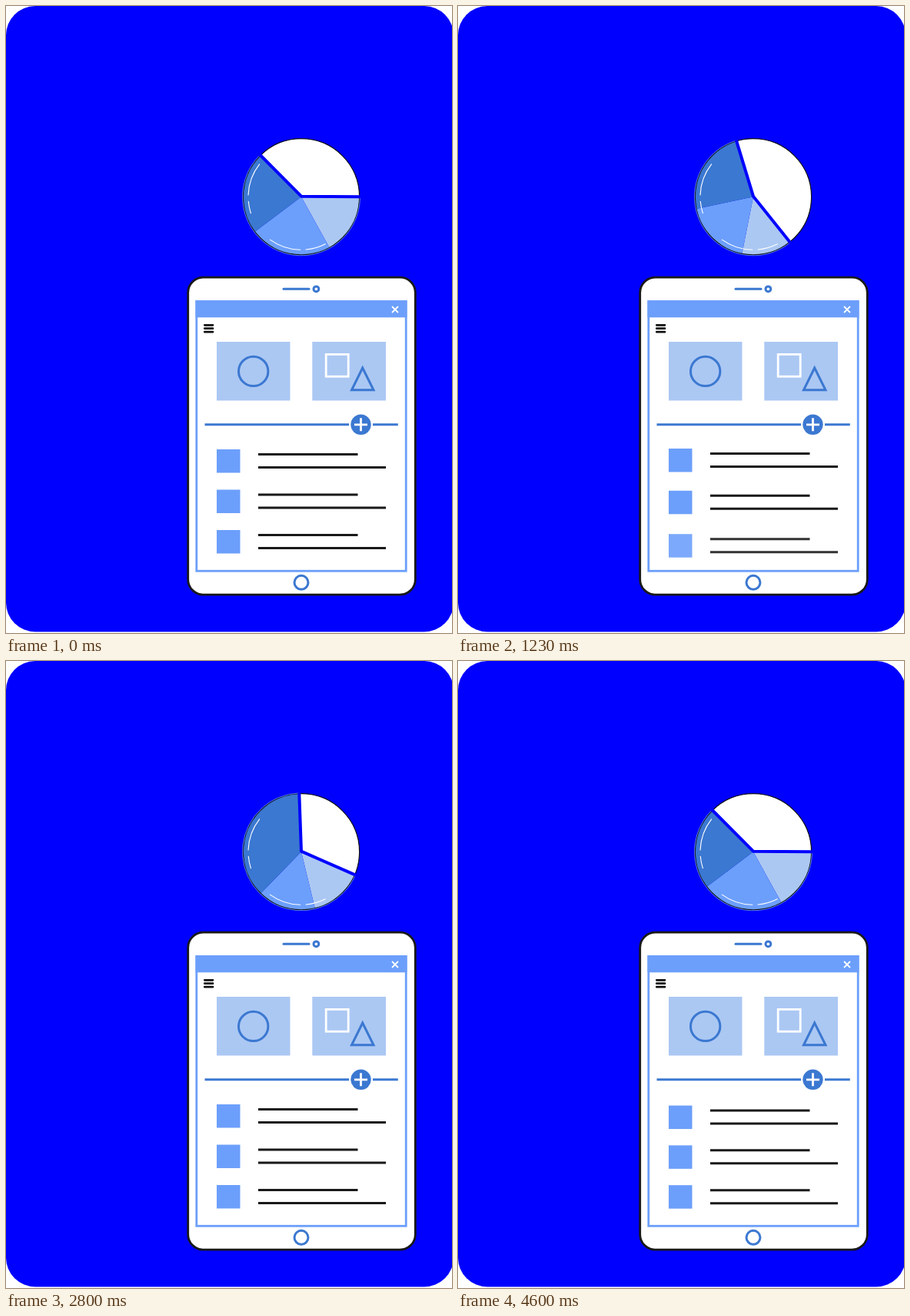
Recreate the animation shown at these times as an HTML page. Size 580 px wide and 816 px high, loop 4.63 s.

```html
<!DOCTYPE html>
<html lang="en">
<head>
<meta charset="utf-8">
<title>Tablet and pie chart</title>
<style>
  html, body { margin: 0; width: 100%; height: 100%; overflow: hidden; background: #fff; }
  svg { display: block; width: 580px; height: 816px; }
  .dark { fill: #3b78d1; }
  .mid { fill: #6c9ffb; }
  .light { fill: #abc8f3; }
  .white { fill: #fff; }
  .line { fill: none; stroke: #3b78d1; stroke-width: 3; }
  .cap { stroke-linecap: round; }
  .ink { fill: none; stroke: #191919; stroke-width: 3; }
  .thin { fill: none; stroke: #fff; stroke-width: 1.1; stroke-linecap: round; }
  .gap { fill: none; stroke: #00f; stroke-width: 4; stroke-linejoin: round; }
</style>
</head>
<body>
<svg viewBox="0 0 580 816">
  <defs>
    <clipPath id="list"><rect x="250" y="547" width="268" height="184.3"/></clipPath>
    <clipPath id="disc"><circle cx="384" cy="248.3" r="77"/></clipPath>
    <g id="row">
      <rect class="mid" x="274" y="577" width="30.5" height="30.5"/>
      <path class="ink" d="M328 583.5H457.5M328 600.5H494"/>
    </g>
  </defs>

  <rect width="582" height="814.5" rx="38" fill="#00f"/>

  <g id="pie">
    <path id="sliceLight" class="light"/>
    <path id="sliceMid" class="mid"/>
    <path id="sliceDark" class="dark"/>
    <path id="sliceWhite" class="white"/>
    <circle cx="384" cy="248.3" r="75.6" fill="none" stroke="#111" stroke-width="1.2"/>
    <path id="rim" fill="none" stroke="#6c9ffb" stroke-width=".8"/>
    <path id="shine" class="thin"/>
    <path id="gap" class="gap" clip-path="url(#disc)"/>
  </g>

  <rect x="236.7" y="353.2" width="295.6" height="413" rx="20" fill="#fff" stroke="#191919" stroke-width="2.8"/>
  <path class="line cap" d="M361 368.3H394"/>
  <circle class="line" cx="403.4" cy="368.3" r="3.4"/>
  <circle class="line" cx="384" cy="750.3" r="9"/>

  <rect x="247.8" y="384.5" width="272.4" height="350.8" fill="none" stroke="#6c9ffb" stroke-width="2.8"/>
  <rect class="mid" x="246.5" y="383" width="275" height="22.3"/>
  <path d="M502 391l8 8m0-8l-8 8" stroke="#fff" stroke-width="1.8"/>
  <path class="cap" d="M258.3 415.3H269M258.3 419.7H269M258.3 424.2H269" stroke="#111" stroke-width="2.7"/>

  <rect class="light" x="274" y="437" width="95.5" height="76.5"/>
  <rect class="light" x="398.3" y="437" width="95.7" height="76.5"/>
  <circle class="line" cx="321.7" cy="475.4" r="19.2"/>
  <rect x="416.2" y="453.4" width="29" height="28.8" fill="none" stroke="#fff" stroke-width="2.8"/>
  <path class="line" d="M463.7 471L449.5 499.8H478Z"/>

  <path class="line" d="M258.5 544.8H509.8"/>
  <circle class="white" cx="461.5" cy="544.8" r="15.5"/>
  <circle class="dark" cx="461.5" cy="544.8" r="13.2"/>
  <path d="M453 544.8H470M461.5 536.3V553.3" stroke="#fff" stroke-width="2.8"/>

  <g id="rows" clip-path="url(#list)">
    <use href="#row"/><use href="#row"/><use href="#row"/><use href="#row"/>
  </g>
</svg>

<script>
const LOOP = 4630;
const $ = id => document.getElementById(id);
const clamp = v => Math.min(1, Math.max(0, v));
const setPath = (id, d) => $(id).setAttribute('d', d);

// Pie: slice edges in degrees, clockwise from three o'clock, as [time, angle]
const CX = 384, CY = 248.3, R = 75.6;
const edges = {
  right: [[70, 0], [830, 42], [1770, 57], [2370, 24], [3330, 22.5], [3800, .5], [3900, 0]],
  light: [[70, 61], [830, 98], [1770, 103], [2370, 73], [3330, 81], [3800, 61]],
  mid: [[70, 143], [830, 175], [1770, 152], [2370, 141], [3330, 125], [3800, 110], [4600, 143]],
  left: [[70, 225.5], [500, 257], [700, 261], [830, 259], [1130, 255], [1650, 243], [1770, 236],
         [2070, 229], [2370, 236], [2790, 268], [3330, 245], [3800, 225.5]]
};

// Monotone cubic interpolation through the keys
function track(keys, t) {
  const last = keys.length - 1;
  if (t <= keys[0][0]) return keys[0][1];
  if (t >= keys[last][0]) return keys[last][1];
  const i = keys.findIndex(k => k[0] > t) - 1;
  const slope = j => (keys[j + 1][1] - keys[j][1]) / (keys[j + 1][0] - keys[j][0]);
  const tangent = j => {
    if (j === 0 || j === last) return 0;
    const a = slope(j - 1), b = slope(j);
    return a * b > 0 ? 2 * a * b / (a + b) : 0;
  };
  const [t0, a0] = keys[i], [t1, a1] = keys[i + 1];
  const span = t1 - t0, u = (t - t0) / span, v = 1 - u;
  return v * v * (1 + 2 * u) * a0 + u * u * (3 - 2 * u) * a1
    + span * u * v * (v * tangent(i) - u * tangent(i + 1));
}

function point(deg, r) {
  const a = deg * Math.PI / 180;
  return (CX + r * Math.cos(a)).toFixed(2) + ' ' + (CY + r * Math.sin(a)).toFixed(2);
}
const arc = (from, to, r) =>
  `${point(from, r)}A${r} ${r} 0 ${to - from > 180 ? 1 : 0} 1 ${point(to, r)}`;
const slice = (from, to) => `M${CX} ${CY}L${arc(from, to, R)}Z`;

function drawPie(t) {
  const [right, light, mid, left] =
    ['right', 'light', 'mid', 'left'].map(name => track(edges[name], t));
  setPath('sliceLight', slice(right, light));
  setPath('sliceMid', slice(light, mid));
  setPath('sliceDark', slice(mid, left));
  setPath('sliceWhite', slice(left, right + 360));
  setPath('rim', 'M' + arc(right, left, 76.5));
  setPath('gap', `M${point(right, 80)}L${CX} ${CY - .6}L${point(left, 80)}`);
}

// List: each row dips, shoots up one place and settles, row after row
const PITCH = 52.5, CYCLE = 1290, START = 625, STAGGER = 47;
const DIP = 3, PEAK = -54.3;

function shift(u) {
  if (u <= 0) return 0;
  if (u < 205) return DIP * u / 205;
  if (u < 605) return PEAK + (DIP - PEAK) * (1 - (u - 205) / 400) ** 2;
  const k = clamp((u - 605) / 120);
  return PEAK + (-PITCH - PEAK) * k * k * (3 - 2 * k);
}

function drawRows(t) {
  const local = t < START ? 0 : (t - START) % CYCLE;
  [...$('rows').children].forEach((row, i) => {
    const u = local - i * STAGGER;
    row.setAttribute('transform', `translate(0 ${(i * PITCH + shift(u)).toFixed(2)})`);
    const alpha = i === 0 ? 1 - clamp((u - 210) / 170) : i === 3 ? clamp((u - 190) / 310) : 1;
    row.setAttribute('opacity', alpha.toFixed(3));
  });
}

setPath('shine', [[162, 175], [182, 218], [91, 126], [63, 85]]
  .map(([a, b]) => 'M' + arc(a, b, 69)).join(''));

const begin = performance.now();
function frame() {
  const t = (performance.now() - begin) % LOOP;
  drawPie(t);
  drawRows(t);
  requestAnimationFrame(frame);
}
frame();
</script>
</body>
</html>
```
